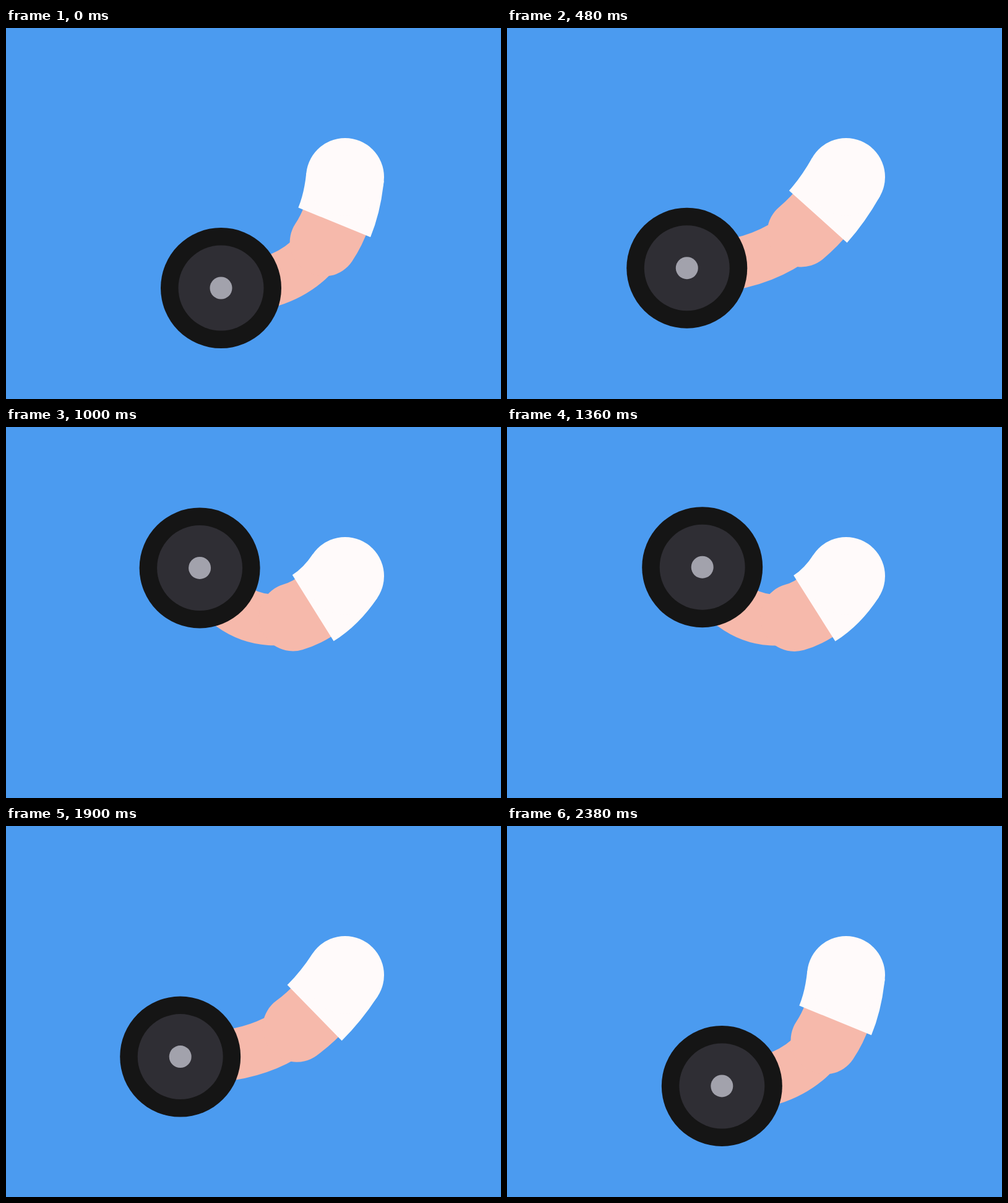
An HTML page for the animation above (2400 ms loop, 800 by 600 pixels).

```html
<!DOCTYPE html>
<html lang="en">
<head>
<meta charset="utf-8">
<title>Dumbbell curl</title>
<style>
  html, body { margin: 0; width: 100%; height: 100%; overflow: hidden; background: #4b9bf0; }
  svg { display: block; width: 100%; height: 100%; }
</style>
</head>
<body>
<svg viewBox="0 0 800 600">
  <rect width="800" height="600" fill="#4b9bf0"/>
  <g fill="none">
    <path class="arm" stroke="#f6b9ab" stroke-width="82.5"/>
    <path class="arm" stroke="#f6b9ab" stroke-width="110" stroke-linecap="round" pathLength="100" stroke-dasharray="37.1 300"/>
    <path class="arm" stroke="#fffafa" stroke-width="126" pathLength="100" stroke-dasharray="25 300"/>
  </g>
  <circle cx="548" cy="241" r="63" fill="#fffafa"/>
  <g id="weight">
    <circle r="97.5" fill="#151515"/>
    <circle r="69" fill="#2f2e34"/>
    <circle r="18" fill="#a2a2ac"/>
  </g>
</svg>
<script>
const LOOP = 2400, TOP = 1208;
const shoulder = [548, 241];
const handle = 120;
const track = [[347.5, 420.5], [253.5, 413], [244.5, 255.1], [318.5, 225.5]];

const arms = document.querySelectorAll('.arm');
const weight = document.getElementById('weight');

function cubic(a, b, c, d, t) {
  const u = 1 - t;
  return u * u * u * a + 3 * u * u * t * b + 3 * u * t * t * c + t * t * t * d;
}

function trackAt(t) {
  return [0, 1].map(i => cubic(...track.map(p => p[i]), t));
}

// Running lengths along the hand's track, for even speed before easing
const STEPS = 400;
const lengths = [0];
for (let i = 1, prev = trackAt(0); i <= STEPS; i++) {
  const p = trackAt(i / STEPS);
  lengths.push(lengths[i - 1] + Math.hypot(p[0] - prev[0], p[1] - prev[1]));
  prev = p;
}

function handAt(part) {
  const goal = part * lengths[STEPS];
  let i = 1;
  while (i < STEPS && lengths[i] < goal) i++;
  const f = (goal - lengths[i - 1]) / (lengths[i] - lengths[i - 1]);
  return trackAt((i - 1 + f) / STEPS);
}

function ease(x) {
  let lo = 0, hi = 1;
  for (let i = 0; i < 30; i++) {
    const mid = (lo + hi) / 2;
    if (cubic(0, 0.666, 0.279, 1, mid) < x) lo = mid; else hi = mid;
  }
  return cubic(0, 0, 1, 1, lo);
}

// The elbow bends more as the hand gets closer to the shoulder
function bend(half) {
  const d = half - 117.9;
  return (59 - 1.07 * d + 0.0045 * d * d) * Math.PI / 180;
}

function draw(ms) {
  const t = ms % LOOP;
  const [hx, hy] = handAt(ease(1 - Math.abs(t - TOP) / TOP));
  const [sx, sy] = shoulder;
  const dx = hx - sx, dy = hy - sy;
  const angle = Math.atan2(dy, dx);
  const b = bend(Math.hypot(dx, dy) / 2);
  const out = angle - b, back = angle + Math.PI + b;
  const d = `M${sx} ${sy}C` + [
    sx + handle * Math.cos(out), sy + handle * Math.sin(out),
    hx + handle * Math.cos(back), hy + handle * Math.sin(back),
    hx, hy
  ].map(n => n.toFixed(3)).join(' ');
  arms.forEach(arm => arm.setAttribute('d', d));
  weight.setAttribute('transform', `translate(${hx.toFixed(3)} ${hy.toFixed(3)})`);
}

const start = performance.now();
function tick() {
  draw(performance.now() - start);
  requestAnimationFrame(tick);
}
draw(0);
requestAnimationFrame(tick);
</script>
</body>
</html>
```
